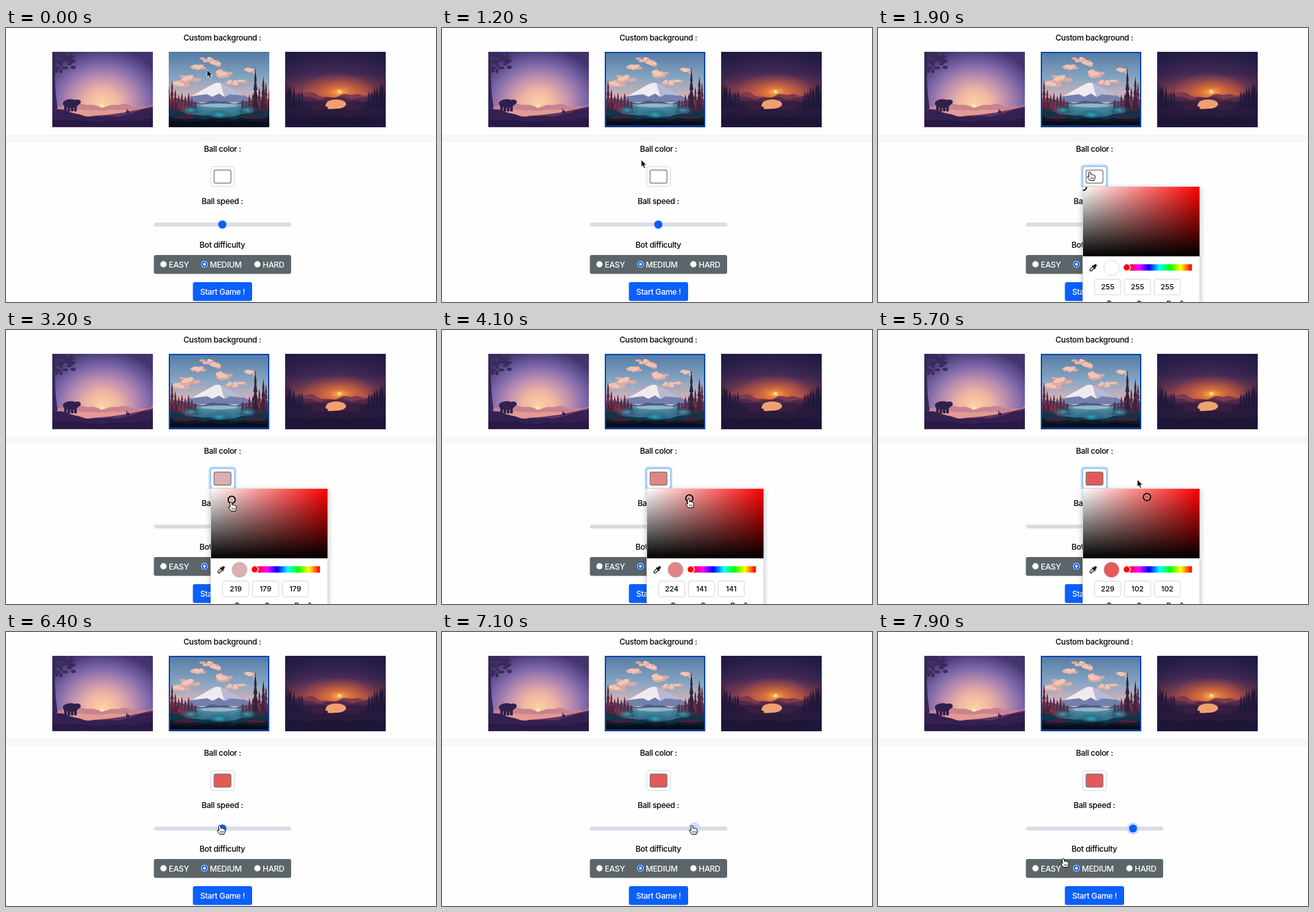
An HTML page for the animation above (8 s loop, 650 by 414 pixels).

```html
<!DOCTYPE html>
<html lang="en">
<head>
<meta charset="utf-8">
<title>Game settings</title>
<style>
html, body { margin: 0; width: 100%; height: 100%; overflow: hidden; background: #fefefe; }
svg { display: block; }
#stage { width: 100vw; height: 100vh; }
text { font: 500 12px Inter, "Liberation Sans", sans-serif; letter-spacing: -.3px; text-anchor: middle; fill: #000; }
.light { fill: #fff; text-anchor: start; }
.num { font-size: 11px; letter-spacing: 0; }
.box { fill: #fff; stroke: #d3d6da; }
</style>
</head>
<body>
<svg id="stage" viewBox="0 0 650 414">
  <defs>
    <radialGradient id="dusk" gradientUnits="userSpaceOnUse" cx="76" cy="78" r="84" gradientTransform="translate(-15.2) scale(1.2 1)">
      <stop offset="0" stop-color="#fbd2a4"/><stop offset=".25" stop-color="#efb5a2"/>
      <stop offset=".5" stop-color="#b78bb0"/><stop offset=".72" stop-color="#7b66a8"/>
      <stop offset="1" stop-color="#43346f"/>
    </radialGradient>
    <linearGradient id="day" x2="0" y2="1">
      <stop offset="0" stop-color="#547ba4"/><stop offset=".35" stop-color="#86a5c2"/>
      <stop offset=".6" stop-color="#d5b3b8"/>
    </linearGradient>
    <linearGradient id="lake" x2="0" y2="1">
      <stop offset="0" stop-color="#5a93ac"/><stop offset="1" stop-color="#0d4458"/>
    </linearGradient>
    <linearGradient id="night" x2="0" y2="1">
      <stop offset="0" stop-color="#2b2450"/><stop offset=".28" stop-color="#482c58"/>
      <stop offset=".58" stop-color="#a04a4c"/>
    </linearGradient>
    <radialGradient id="teal"><stop offset="0" stop-color="#2cabc4"/><stop offset="1" stop-color="#0b4a62" stop-opacity="0"/></radialGradient>
    <radialGradient id="sun"><stop offset="0" stop-color="#ffb850"/><stop offset=".25" stop-color="#ee7d38" stop-opacity=".8"/><stop offset="1" stop-color="#c8503c" stop-opacity="0"/></radialGradient>
    <radialGradient id="shade" cy=".6" r=".75"><stop offset=".4" stop-color="#1d1740" stop-opacity="0"/><stop offset="1" stop-color="#1d1740" stop-opacity=".8"/></radialGradient>
    <linearGradient id="sat"><stop stop-color="#fff"/><stop offset="1" stop-color="#f00"/></linearGradient>
    <linearGradient id="val" x2="0" y2="1"><stop stop-opacity="0"/><stop offset="1"/></linearGradient>
    <linearGradient id="hue"></linearGradient>
    <filter id="soft" x="-20%" y="-20%" width="140%" height="140%"><feGaussianBlur stdDeviation="5"/></filter>
    <clipPath id="area"><rect x="310" y="240" width="176" height="174"/></clipPath>
  </defs>

  <rect width="650" height="414" fill="#fefefe"/>
  <rect y="161" width="650" height="12" fill="#f6f8f8"/>
  <text x="327" y="19">Custom background :</text>
  <svg id="valley" x="70" y="36" width="152" height="113.5"></svg>
  <svg id="peak" x="246" y="36" width="152" height="113.5"></svg>
  <svg id="sunset" x="422" y="36" width="152" height="113.5"></svg>
  <rect id="chosen" x="247" y="37" width="150" height="111.5" fill="none" stroke="#0b45b5" stroke-width="2"/>

  <text x="327.3" y="186.5">Ball color :</text>
  <rect id="focus" x="306.5" y="206.5" width="41.5" height="35.5" rx="5" fill="#b9d4fc"/>
  <rect id="well" x="309.5" y="209.5" width="36" height="30" rx="3.5" fill="#fff"/>
  <rect id="swatch" x="314.5" y="214.7" width="25.6" height="19.6" rx="2.6" stroke="#777" stroke-width="1.2"/>

  <text x="327" y="265.5">Ball speed :</text>
  <rect x="223.5" y="294" width="208" height="6" rx="3" fill="#dadde4"/>
  <g id="thumb">
    <g id="halo"><circle r="9" fill="#bcd5fd"/><circle r="7" fill="#fff"/></g>
    <circle id="knob" r="6.2"/>
  </g>

  <text x="327" y="332">Bot difficulty</text>
  <rect x="223.5" y="343" width="207.5" height="28.5" rx="3" fill="#5b656a"/>
  <circle cx="238" cy="357" r="4.7" fill="#fff"/>
  <circle cx="300" cy="357" r="5" fill="#fff"/>
  <circle cx="300" cy="357" r="3.2" fill="#fff" stroke="#0b5ffb" stroke-width="2.2"/>
  <circle cx="380" cy="357" r="4.7" fill="#fff"/>
  <text class="light" x="246" y="361.5">EASY</text>
  <text class="light" x="308" y="361.5">MEDIUM</text>
  <text class="light" x="388" y="361.5">HARD</text>
  <rect x="282.5" y="384" width="89.5" height="28.5" rx="3" fill="#0b5ffb"/>
  <text x="327.3" y="402.5" style="fill:#fff">Start Game !</text>

  <g id="picker">
    <rect x="309" y="242" width="178" height="190" rx="3" opacity=".24" filter="url(#soft)"/>
    <rect x="309.5" y="239.5" width="177" height="190" fill="#fff" stroke="#d0d0d0" stroke-width=".8"/>
    <rect x="310" y="240" width="176" height="105" fill="url(#sat)"/>
    <rect x="310" y="240" width="176" height="105" fill="url(#val)"/>
    <g clip-path="url(#area)"><g id="ring">
      <circle id="ringFill" r="5.3" stroke="#000" stroke-width="1.9"/>
      <circle r="3.9" fill="none" stroke="#fff" stroke-opacity=".7" stroke-width=".8"/>
    </g></g>
    <g transform="translate(325 362.5) rotate(45)">
      <rect x="-1.6" y="-2" width="3.2" height="8" rx="1.4" fill="#fff" stroke="#111" stroke-width="1.2"/>
      <rect x="-3.5" y="-2.6" width="7" height="1.9" rx=".8" fill="#111"/>
      <rect x="-2" y="-7.2" width="4" height="5.6" rx="1.8" fill="#111"/>
    </g>
    <circle id="dot" cx="353" cy="362.3" r="11.7" stroke="#cfcfcf" stroke-width=".8"/>
    <rect x="372" y="357" width="102.5" height="9.6" fill="url(#hue)"/>
    <circle cx="376" cy="361.8" r="5.4" fill="#f00" stroke="#fff" stroke-width="1.4"/>
    <g id="fields"></g>
    <path d="M456.5 414.5l2.5-2.5 2.5 2.5" fill="none" stroke="#333" stroke-width="1.2"/>
  </g>

  <g id="cursor">
    <path id="arrow" d="M0 0V11L2.5 8.8 4.3 12.8 6.3 11.9 4.5 8H8Z" stroke="#fff" stroke-width=".8"/>
    <g id="hand" stroke="#000" stroke-linejoin="round">
      <path d="M-1.6 1.2Q0-.8 1.4 1.2L1.8 4.6Q4 3.4 4.5 5 6 4.4 6.7 5.8 8.4 5.6 8.2 7.4 8.2 10 6.8 13.5H0Q-2.4 10.4-3.7 7.8-3 6-1 8Z" fill="#fff"/>
      <path d="M1.6 8.8v2.5M3.5 8.8v2.5M5.4 8.8v2.5" stroke-width=".8"/>
    </g>
  </g>
</svg>
<script>
const $ = id => document.getElementById(id);
const show = (id, on) => $(id).setAttribute('visibility', on ? 'visible' : 'hidden');
const move = (id, x, y) => $(id).setAttribute('transform', `translate(${x} ${y})`);
const repeat = (n, make) => Array.from({ length: n }, (_, i) => make(i / (n - 1), i)).join('');

// Scenery, each picture 152 by 114
const shape = (d, fill) => `<path d="${d}" fill="${fill}"/>`;
const disc = (x, y, rx, ry, fill) => `<ellipse cx="${x}" cy="${y}" rx="${rx}" ry="${ry}" fill="${fill}"/>`;
const sheet = fill => `<rect width="152" height="114" fill="${fill}"/>`;

let seed = 11;
const rnd = () => (seed = seed * 16807 % 2147483647) / 2147483647;
const spread = size => (rnd() - .5) * size;

// Land below a wavy line; dip lowers its middle.
const land = (y, wave, dip, fill) => shape('M0 114' + repeat(39, k =>
  `L${152 * k} ${y + dip * Math.sin(Math.PI * k) + wave * (Math.sin(17 * k + y) + .5 * Math.sin(41 * k))}`) + 'V114Z', fill);

const pine = (x, base, h, w, fill) => repeat(5, k => {
  const top = base - h * (1 - .8 * k), half = w / 2 * (.3 + .7 * k);
  return shape(`M${x} ${top}l${half} ${h * .3}h${-2 * half}z`, fill);
});

// Pines on both sides, shrinking towards the middle.
const groves = (n, reach, base, h, w, fill) => repeat(n, k =>
  [reach * k, 152 - reach * k].map(x => pine(x, base, h * (1 - .6 * k) * (.75 + .5 * rnd()), w, fill)).join(''));

const cloud = (x, y, size, fill) => repeat(7, () =>
  disc(x + spread(size * 2), y + spread(size * .8), size * (.3 + .4 * rnd()), size * (.15 + .2 * rnd()), fill));

const deer = (x, y, fill) => disc(x, y - 3, 2.5, 1.3, fill) + shape(`M${x - 2} ${y}v-7h1v4h3v3z`, fill);

$('valley').innerHTML = sheet('url(#dusk)') +
  land(81, 2, 0, '#c98290') + land(88, .6, 0, '#e39a91') + disc(75, 82, 3, 2.4, '#ffe9b0') +
  shape('M152 82Q110 94 60 97V114H152Z', '#5f3564') + land(84, 1, 14, '#352052') + land(101, 1, 4, '#281946') +
  disc(28, 78, 12, 6.5, '#30204c') + disc(38, 76, 5, 4, '#30204c') +
  repeat(4, k => `<rect x="${18 + 15 * k}" y="80" width="4" height="10" fill="#30204c"/>`) +
  deer(114, 93, '#30204c') +
  shape('M0 0H6Q1 40 8 86H0Z', '#35275a') +
  repeat(45, () => disc(32 * rnd() ** 1.5, 32 * rnd() ** 1.3, 2 + 3 * rnd(), 1.5 + 2 * rnd(), '#392b5b'));

$('peak').innerHTML = sheet('url(#day)') +
  repeat(9, k => {
    const x = 18 + 105 * k, y = 30 + 18 * Math.sin(8 * k + 1.5), size = 5 + 6 * rnd();
    return cloud(x, y, size, '#dfaaa3') + cloud(x, y - 1, size * .8, '#f2c6b4');
  }) +
  shape('M18 76L66 49Q74 44 82 49L134 76Z', '#7480ac') +
  shape('M34 67L66 49Q74 44 82 49L114 66 92 64 84 68 76 63 66 68 58 64Z', '#f1ebf0') +
  shape('M78 47L114 66 92 64 84 68Z', '#b5bad6') + land(72, 2, 4, '#4f5a86') +
  '<rect y="79" width="152" height="35" fill="url(#lake)"/>' + disc(76, 81, 28, 3, '#8fb8c8') +
  groves(9, 40, 90, 44, 11, '#5c2940') + groves(7, 32, 94, 31, 10, '#87304a') + groves(5, 22, 96, 28, 12, '#492339') +
  pine(131, 92, 68, 13, '#30243e') + pine(143, 92, 55, 13, '#3c2840') +
  land(86, 1, 12, '#103448') + repeat(3, k => disc(34 + 84 * k, 88 + 7 * Math.sin(Math.PI * k), 19, 8, 'url(#teal)')) +
  land(97, 1, 4, '#0d1a2b') + land(105, .8, 0, '#080d19') + disc(24, 99, 18, 2.5, '#42213a') + disc(130, 99, 18, 2.5, '#42213a');

$('sunset').innerHTML = sheet('url(#night)') +
  disc(82, 61, 62, 29, 'url(#sun)') + disc(82, 60, 2.6, 2.6, '#ffe08c') +
  land(57, 2.5, 10, '#7b3a4e') + land(65, 2, 5, '#542a48') + land(75, 1, 0, '#381f42') +
  disc(77, 79, 15, 7, '#f0a070') + disc(69, 82, 9, 5, '#f0a070') +
  groves(10, 38, 92, 48, 11, '#2a1c40') + groves(5, 26, 98, 58, 13, '#211837') +
  land(84, .8, 3, '#2a1a3c') + land(98, 1, 0, '#1d1533') + deer(62, 87, '#2a1a3c') + sheet('url(#shade)');

$('hue').innerHTML = repeat(7, k => `<stop offset="${.06 + .93 * k}" stop-color="hsl(${360 - 360 * k} 100% 50%)"/>`);
$('fields').innerHTML = ['R', 'G', 'B'].map((name, i) => {
  const x = 327.5 + 45 * i;
  return `<rect class="box" x="${x}" y="379.5" width="39.5" height="23.5" rx="2"/>
    <text class="num" x="${x + 19.8}" y="395.3"></text>
    <text class="num" x="${x + 22}" y="420">${name}</text>`;
}).join('');
const nums = [...document.querySelectorAll('#fields rect + text')];

// Moments of the clicks, in ms
const CHOOSE = 500, OPEN = 1900, CLOSE = 5800, GRAB = 6600, DROP = 7200;

const ease = (t, a, b) => {
  const k = Math.min(1, Math.max(0, (t - a) / (b - a)));
  return k * k * (3 - 2 * k);
};

// Pointer moves: from, to, x, y
const moves = [
  [CHOOSE, 1300, 301, 205], [1200, 1600, 320, 217], [2300, 2800, 337, 254], [2800, 3200, 340, 260],
  [3200, 5000, 405, 250], [5300, 5700, 392, 226], [CLOSE, 6350, 323, 292], [GRAB, DROP, 382, 292], [DROP, 7900, 280, 342]
];

function pointer(t) {
  let x = 304, y = 63;
  for (const [a, b, toX, toY] of moves) {
    const k = ease(t, a, b);
    x += (toX - x) * k;
    y += (toY - y) * k;
  }
  return [x, y];
}

function draw(t) {
  const open = t >= OPEN && t < CLOSE;
  const [cx, cy] = pointer(t);
  const onWell = cx > 309 && cx < 346 && cy > 209 && cy < 240;
  const hand = onWell || open && cx > 310 && cy > 240 || Math.abs(cy - 295) < 6 || cy > 340;
  move('cursor', cx, cy);
  show('hand', hand);
  show('arrow', !hand);
  show('chosen', t >= CHOOSE);

  $('picker').style.display = open ? '' : 'none';
  show('focus', open);
  $('well').setAttribute('stroke', open ? '#86b7fe' : '#d5d9de');

  const press = ease(t, 2700, 3000), slide = ease(t, 3200, 5000);
  const s = .1826 * press + .372 * slide, v = 255 - 36 * press + 10 * slide;
  const low = v * (1 - s), shown = v * (1 - 1.1 * s);
  const color = `rgb(${v}, ${shown}, ${shown})`;
  for (const id of ['swatch', 'dot', 'ringFill']) $(id).setAttribute('fill', color);
  [v, low, low].forEach((n, i) => nums[i].textContent = Math.round(n));
  move('ring', 310 + 176 * s - press, 240 + 105 * (1 - v / 255) + 1.7 * press);

  move('thumb', 327 + 58.5 * ease(t, GRAB, DROP), 297);
  $('knob').setAttribute('fill', t >= GRAB && t < DROP ? '#b6d4fe' : '#0b5ffb');
  show('halo', t >= GRAB);
}

const start = performance.now();
function tick() {
  const t = (performance.now() - start) % 8000;
  draw(Math.floor(t / 100) * 100);
  requestAnimationFrame(tick);
}
tick();
</script>
</body>
</html>
```
